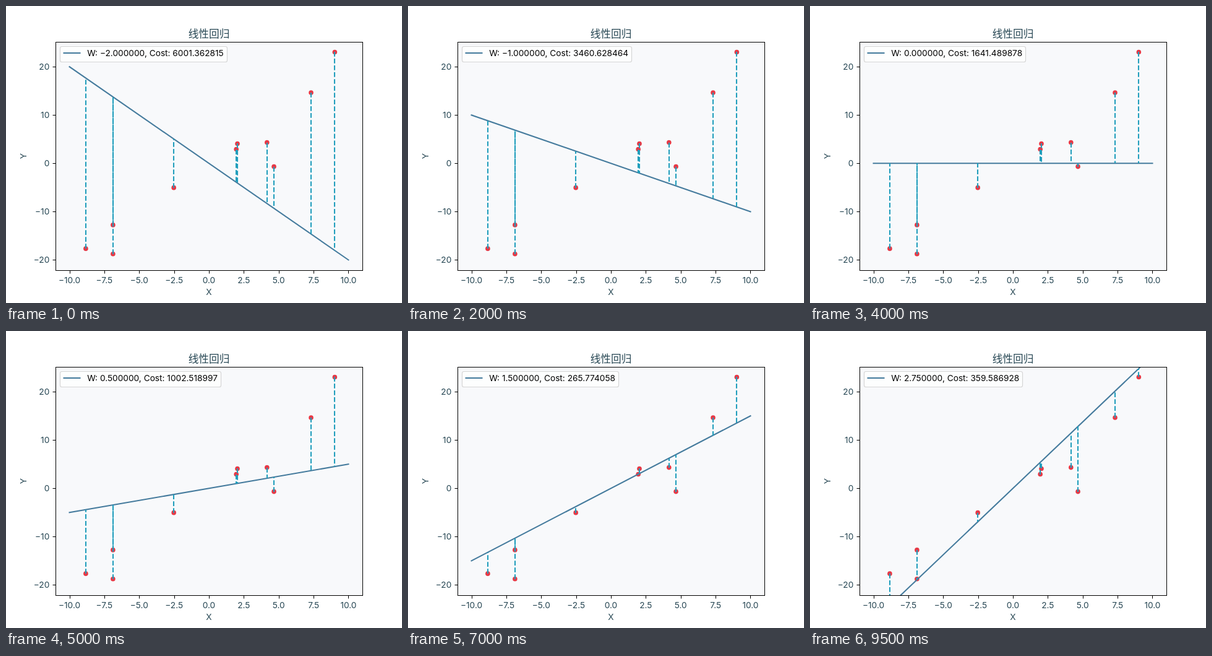
Animation, 640 px wide and 480 px high, one loop 10 s. Source, as an HTML page:

```html
<!DOCTYPE html>
<html lang="zh-CN">
<head>
<meta charset="utf-8">
<title>线性回归</title>
<style>
  html, body { margin: 0; width: 100%; height: 100%; overflow: hidden; background: #fff; }
  svg { display: block; width: 640px; height: 480px; }
  text { font-family: Inter, "Noto Sans CJK SC", "Noto Sans CJK", sans-serif; font-size: 13.7px; fill: #264653; }
  .title { font-family: "Noto Sans CJK SC", "Noto Sans CJK", sans-serif; font-size: 16.67px; }
  .mid { text-anchor: middle; }
  .end { text-anchor: end; }
  .axis { fill: none; stroke: #000; stroke-width: 1; }
  .fit { stroke: #457b9d; stroke-width: 2.08; stroke-linecap: square; }
  .gap { stroke: #219ebc; stroke-width: 2.08; stroke-dasharray: 7.71 3.33; }
  .dot { fill: #e63946; }
  .box { fill: #fff; fill-opacity: .8; stroke: #ccc; stroke-opacity: .8; stroke-width: 1.2; }
  .key { fill: #000; }
</style>
</head>
<body>
<svg id="stage" viewBox="0 0 640 480"></svg>
<script>
const stage = document.getElementById('stage');
const STEP_MS = 500, STEPS = 20;

// Each point is [x, noise], with y = 2x + noise.
const points = [
  [-8.83, 0], [-6.88, 1], [-6.88, -5], [-2.52, 0], [1.96, -1],
  [2.04, 0], [4.16, -4], [4.66, -10], [7.32, 0], [9.02, 5]
].map(([x, noise]) => ({ x, y: 2 * x + noise }));

const px = x => 328 + x * 496 / 22;
const py = y => 254.3 - y * 7.805;
const crisp = v => Math.round(v) + 0.5;

function add(parent, tag, attrs, text) {
  const el = document.createElementNS('http://www.w3.org/2000/svg', tag);
  set(el, attrs);
  if (text !== undefined) el.textContent = text;
  parent.appendChild(el);
  return el;
}

function set(el, attrs) {
  for (const name in attrs) el.setAttribute(name, attrs[name]);
}

const signed = (v, digits) => v.toFixed(digits).replace('-', '\u2212');

// Squared error, expanded around the true slope of 2.
function cost(w) {
  const u = w - 2;
  return 168 - 15.1491741 * u + 360.7978824 * u * u;
}

add(stage, 'rect', { x: 80, y: 58, width: 496, height: 369, fill: '#f8f9fb' });
const clip = add(add(stage, 'defs', {}), 'clipPath', { id: 'plot' });
add(clip, 'rect', { x: 80, y: 58, width: 496, height: 369 });

const plot = add(stage, 'g', { 'clip-path': 'url(#plot)' });
for (const p of points) add(plot, 'circle', { class: 'dot', cx: px(p.x), cy: py(p.y), r: 3.8 });
const fit = add(plot, 'line', { class: 'fit', x1: px(-10), x2: px(10) });
const gaps = points.map(p => {
  const x = Math.round(px(p.x));
  return add(plot, 'line', { class: 'gap', x1: x, x2: x, y1: Math.round(py(p.y)) });
});

for (let x = -10; x <= 10; x += 2.5) {
  add(stage, 'path', { class: 'axis', d: `M${crisp(px(x))} 428v4.5` });
  add(stage, 'text', { class: 'mid', x: px(x), y: 448 }, signed(x, 1));
}
for (let y = -20; y <= 20; y += 10) {
  add(stage, 'path', { class: 'axis', d: `M80 ${crisp(py(y))}h-4.5` });
  add(stage, 'text', { class: 'end', x: 70.3, y: py(y) + 5 }, signed(y, 0));
}
add(stage, 'rect', { class: 'axis', x: 80.5, y: 58.5, width: 496, height: 369 });

add(stage, 'text', { class: 'title mid', x: 328, y: 50.5 }, '线性回归');
add(stage, 'text', { class: 'mid', x: 328, y: 467 }, 'X');
add(stage, 'text', { class: 'mid', transform: 'translate(32.5 242.5) rotate(-90)' }, 'Y');

const box = add(stage, 'rect', { class: 'box', x: 87.5, y: 65.5, height: 25, rx: 2.8 });
add(stage, 'line', { class: 'fit', x1: 93.5, x2: 119.5, y1: 76, y2: 76 });
const label = add(stage, 'text', { class: 'key', x: 131.3, y: 81 });

let shown = -1;

function draw(time) {
  const step = Math.floor(time / STEP_MS) % STEPS;
  if (step === shown) return;
  shown = step;
  const w = -2 + step * 0.25;
  set(fit, { y1: py(-10 * w), y2: py(10 * w) });
  gaps.forEach((gap, i) => set(gap, { y2: Math.round(py(points[i].x * w)) }));
  label.textContent = `W: ${signed(w, 6)}, Cost: ${cost(w).toFixed(6)}`;
  set(box, { width: Math.round(label.getComputedTextLength() + 49.4) });
}

const start = performance.now();
function tick() {
  draw(performance.now() - start);
  requestAnimationFrame(tick);
}
tick();
</script>
</body>
</html>
```
